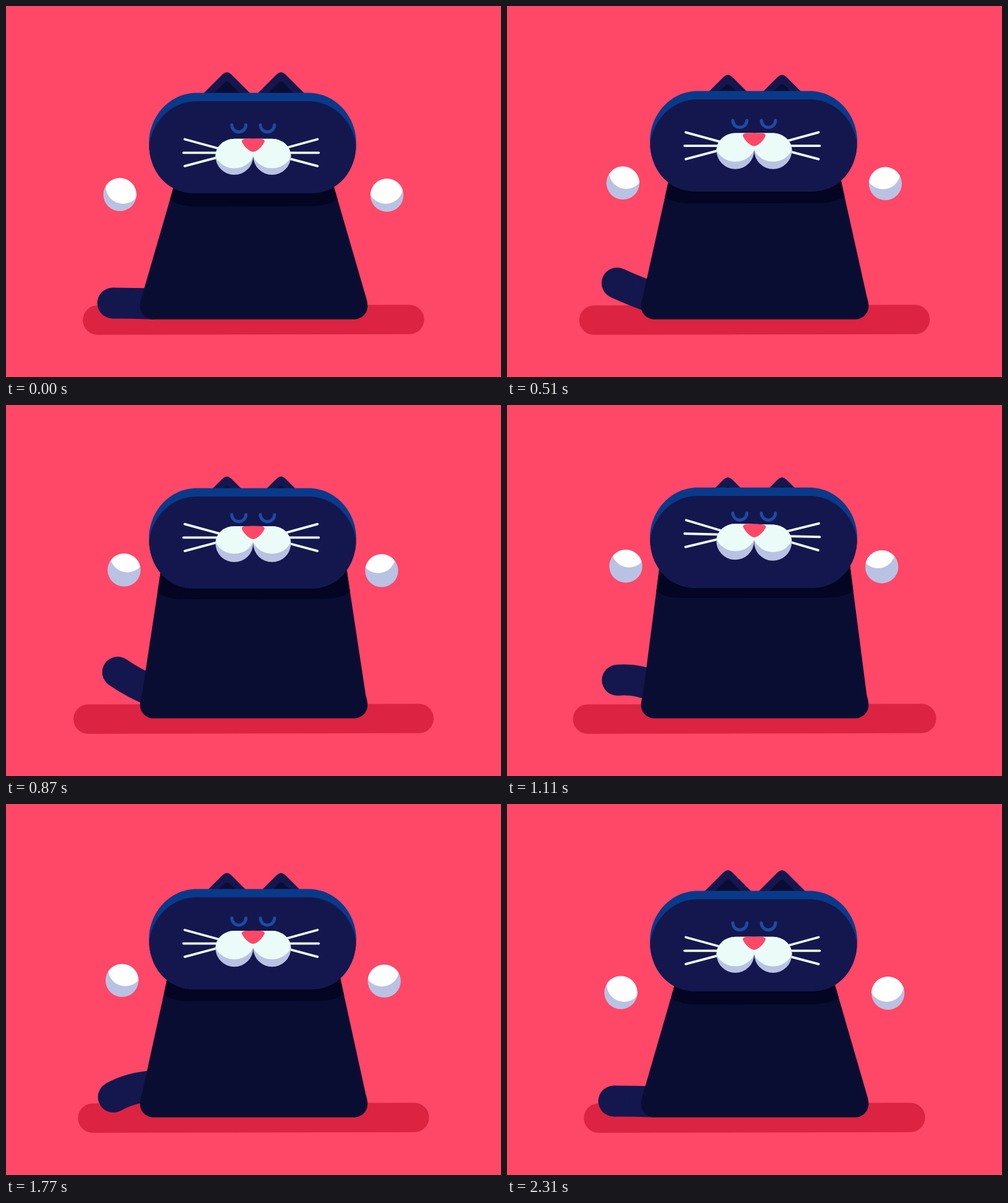
Write an HTML page with a canvas that moves like this. It is 800 by 600 pixels and loops after 2.34 s.

```html
<!DOCTYPE html>
<html lang="en">
<head>
<meta charset="utf-8">
<title>Meditating cat</title>
<style>
  html, body { margin: 0; width: 100%; height: 100%; overflow: hidden; background: #ff4767; }
  canvas { display: block; }
</style>
</head>
<body>
<canvas id="stage" width="800" height="600"></canvas>
<script>
const ctx = document.getElementById('stage').getContext('2d');
const LOOP = 2340, STEP = 30, INHALE_END = 1140, EXHALE_END = 2310;
const C = {
  pink: '#ff4767', floor: '#dc2342', body: '#0a0d32', head: '#14174d', rim: '#093a8a',
  shadow: '#030522', eye: '#1b4ba6', mint: '#ebfcf8', grey: '#b9c2e3', white: '#ffffff'
};

// time, tip height, tip angle in degrees, base height
const TAIL = [
  [0, 480.5, 0, 482],
  [510, 448, 25, 473],
  [870, 432, 35, 464],
  [1110, 445, -5, 456],
  [1440, 463.5, -38, 446.5],
  [1770, 474, -30, 456],
  [LOOP, 480.5, 0, 482]
];

const smooth = x => x * x * (3 - 2 * x);

function breath(t) {
  if (t < INHALE_END) return smooth(t / INHALE_END);
  return smooth(Math.max(0, (EXHALE_END - t) / (EXHALE_END - INHALE_END)));
}

// Short muzzle wiggle around the top of the breath
function twitch(t) {
  const u = (t - 1020) / 360;
  return u > 0 && u < 1 ? Math.sin(u * 2 * Math.PI) * 1.42 * Math.PI / 180 : 0;
}

function tangent(i, k) {
  if (i === 0 || i === TAIL.length - 1) return 0;
  const a = TAIL[i - 1], b = TAIL[i + 1];
  return (b[k] - a[k]) / (b[0] - a[0]);
}

function tailValue(t, k) {
  let i = 0;
  while (t >= TAIL[i + 1][0]) i++;
  const a = TAIL[i], b = TAIL[i + 1], d = b[0] - a[0], u = (t - a[0]) / d;
  return a[k] + (b[k] - a[k]) * smooth(u)
    + d * u * (1 - u) * ((1 - u) * tangent(i, k) - u * tangent(i + 1, k));
}

function fill(path, color) {
  ctx.fillStyle = color;
  ctx.fill(path);
}

function stroke(path, color, width, cap = 'round') {
  ctx.strokeStyle = color;
  ctx.lineWidth = width;
  ctx.lineCap = cap;
  ctx.stroke(path);
}

function line(x1, y1, x2, y2, color, width) {
  const path = new Path2D();
  path.moveTo(x1, y1);
  path.lineTo(x2, y2);
  stroke(path, color, width);
}

function ellipse(x, y, rx, ry = rx) {
  const path = new Path2D();
  path.ellipse(x, y, rx, ry, 0, 0, 2 * Math.PI);
  return path;
}

function clipped(path, draw) {
  ctx.save();
  ctx.clip(path);
  draw();
  ctx.restore();
}

function drawFloor(p) {
  line(148 - 17.7 * p, 508, 652 + 17.9 * p, 507, C.floor, 47.6);
}

function drawTail(t) {
  const y = tailValue(t, 1), angle = tailValue(t, 2) * Math.PI / 180;
  const x = 172.5 + (480.5 - y) * 0.165, reach = 32;
  const path = new Path2D();
  path.moveTo(x, y);
  path.quadraticCurveTo(x + reach * Math.cos(angle), y + reach * Math.sin(angle), 240, tailValue(t, 3));
  stroke(path, C.head, 50, 'butt');
  fill(ellipse(x, y, 25), C.head);
}

function drawBody(p) {
  const mirror = x => 801 - x;
  const shoulder = 280.4 - 33.8 * p;
  const body = new Path2D();
  body.moveTo(shoulder, 260);
  body.lineTo(219.5, 470);
  body.quadraticCurveTo(216.6, 479, 216.6, 485);
  body.bezierCurveTo(216.6, 498, 227, 506.8, 239, 506.8);
  body.lineTo(mirror(239), 506.8);
  body.bezierCurveTo(mirror(227), 506.8, mirror(216.6), 498, mirror(216.6), 485);
  body.quadraticCurveTo(mirror(216.6), 479, mirror(219.5), 470);
  body.lineTo(mirror(shoulder), 260);
  fill(body, C.body);

  const edge = 266 - 23 * p, bottom = 324.3 - 12 * p;
  const shade = new Path2D();
  shade.moveTo(edge - 2, 240);
  shade.lineTo(edge - 2, bottom - 11);
  shade.quadraticCurveTo(edge + 14, bottom, edge + 40, bottom);
  shade.lineTo(mirror(edge + 40), bottom - 0.6);
  shade.quadraticCurveTo(mirror(edge + 14), bottom - 0.6, mirror(edge - 2), bottom - 12);
  shade.lineTo(mirror(edge - 2), 240);
  clipped(body, () => fill(shade, C.shadow));
}

function earPath(x, tip, round) {
  const half = 46, apex = tip - round / 2, path = new Path2D();
  path.moveTo(x - half, apex + half);
  path.lineTo(x - round, apex + round);
  path.quadraticCurveTo(x, apex, x + round, apex + round);
  path.lineTo(x + half, apex + half);
  return path;
}

function drawEars(p) {
  const tip = 107 + 10 * p;
  for (const x of [357, 444.5]) {
    const outer = earPath(x, tip, 7);
    fill(outer, C.head);
    clipped(outer, () => fill(earPath(x, tip + 15, 4), C.body));
  }
}

function headPath(top, middle, bottom) {
  const path = new Path2D();
  path.moveTo(308, top);
  path.lineTo(489, top);
  path.bezierCurveTo(532, top, 566, middle - 44, 566, middle);
  path.bezierCurveTo(566, middle + 45, 537, bottom, 493, bottom);
  path.lineTo(304, bottom);
  path.bezierCurveTo(260, bottom, 231, middle + 45, 231, middle);
  path.bezierCurveTo(231, middle - 44, 265, top, 308, top);
  return path;
}

function drawHead(p) {
  ctx.save();
  ctx.translate(0, -7 * p);
  const head = headPath(140.5, 222, 302.6);
  fill(head, C.rim);
  clipped(head, () => fill(headPath(153.9, 235, 316), C.head));
  ctx.restore();
}

function drawEyes(p) {
  for (const x of [376.3, 422.5]) {
    const path = new Path2D();
    path.arc(x, 192.3 - 17.6 * p, 11.4, 0, Math.PI);
    stroke(path, C.eye, 5);
  }
}

function drawWhiskers(p) {
  const y = 237.3 - 26.6 * p;
  for (const side of [-1, 1]) {
    const x = d => 396.2 + side * d;
    line(x(107.3), y - 21.8, x(45), y - 4.8, C.mint, 3.8);
    line(x(109.2), y, x(45), y, C.mint, 3.8);
    line(x(107.3), y + 21.6, x(45), y + 5, C.mint, 3.8);
  }
}

function drawMuzzle(p) {
  const muzzle = new Path2D();
  muzzle.arc(369, 242.5, 30.5, 0, Math.PI);
  muzzle.ellipse(369, 242.5, 30.5, 27.7, 0, Math.PI, 1.5 * Math.PI);
  muzzle.ellipse(430, 242.5, 30.5, 27.7, 0, 1.5 * Math.PI, 2 * Math.PI);
  muzzle.arc(430, 242.5, 30.5, 0, Math.PI);

  const nose = new Path2D();
  nose.moveTo(381, 219);
  nose.quadraticCurveTo(381, 215.5, 386, 215);
  nose.quadraticCurveTo(399.5, 214, 413, 215);
  nose.quadraticCurveTo(418, 215.5, 418, 219);
  nose.bezierCurveTo(415, 227, 405, 236, 399.5, 236);
  nose.bezierCurveTo(394, 236, 384, 227, 381, 219);

  ctx.save();
  ctx.translate(0, -22 * p);
  fill(muzzle, C.grey);
  clipped(muzzle, () => {
    for (const x of [369, 430]) fill(ellipse(x, 232 - 3.5 * p, 33, 30.5), C.mint);
  });
  fill(nose, C.pink);
  ctx.restore();
}

function drawFace(t, p) {
  const pivot = 237 - 24 * p;
  drawEyes(p);
  ctx.save();
  ctx.translate(399, pivot);
  ctx.rotate(twitch(t));
  ctx.translate(-399, -pivot);
  drawWhiskers(p);
  drawMuzzle(p);
  ctx.restore();
}

function drawPaw(x, y, lightX, lightY) {
  const paw = ellipse(x, y, 26.7);
  fill(paw, C.grey);
  clipped(paw, () => fill(ellipse(x + lightX, y + lightY, 28), C.white));
}

function render(t) {
  const p = breath(t);
  ctx.fillStyle = C.pink;
  ctx.fillRect(0, 0, 800, 600);
  drawFloor(p);
  drawTail(t);
  drawBody(p);
  drawEars(p);
  drawHead(p);
  drawFace(t, p);
  drawPaw(184 + 8 * p, 305 - 44.4 * p, 5.3, -13 - 13 * p);
  drawPaw(615.7 - 10 * p, 306 - 44.4 * p, -2 - 4.2 * p, -14 - 11.7 * p);
}

function tick() {
  const t = performance.now() % LOOP;
  render(Math.floor(t / STEP) * STEP);
  requestAnimationFrame(tick);
}
tick();
</script>
</body>
</html>
```
